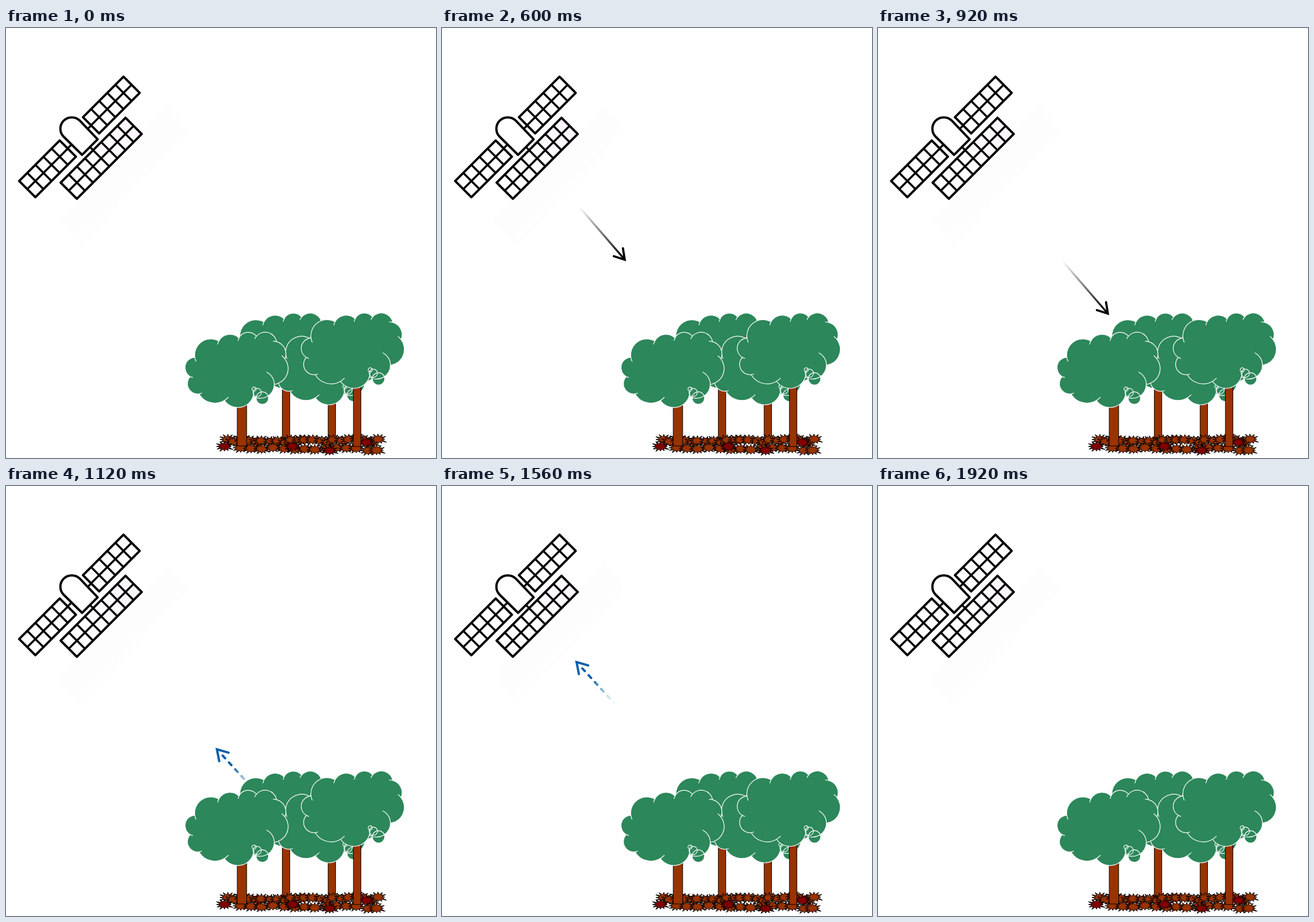
These frames come from a looping animation (748 by 748 pixels, 2250 ms). An HTML page:

```html
<!DOCTYPE html>
<html lang="en">
<head>
<meta charset="utf-8">
<title>Satellite and forest</title>
<style>
html, body { margin: 0; width: 100%; height: 100%; overflow: hidden; background: #fff; }
svg { display: block; width: 100vw; height: 100vh; }
.grid { fill: none; stroke: #000; stroke-width: 3.6; }
.hull { stroke: #000; stroke-width: 4; stroke-linejoin: round; }
.cloud { fill: #2c875a; stroke: #fff; stroke-width: 1.2; }
.vein { fill: none; stroke: #fff; stroke-width: 1.2; }
.trunk, .leaf { fill: #993300; stroke: #000; stroke-width: 1; }
.leaf.dark { fill: #800000; }
</style>
</head>
<body>
<svg id="stage" viewBox="0 0 748 748">
  <defs>
    <linearGradient id="inkDown" gradientUnits="userSpaceOnUse" x1="-125" y1="0" x2="-10" y2="0">
      <stop offset="0" stop-color="#000" stop-opacity="0"/>
      <stop offset="1" stop-color="#000"/>
    </linearGradient>
    <linearGradient id="inkUp" gradientUnits="userSpaceOnUse" x1="-102" y1="0" x2="-46" y2="0">
      <stop offset="0" stop-color="#9fc8d6" stop-opacity="0.1"/>
      <stop offset="1" stop-color="#0a60aa"/>
    </linearGradient>
    <linearGradient id="veil" gradientUnits="userSpaceOnUse" x1="185" y1="236" x2="224" y2="277">
      <stop offset="0" stop-color="#fdfdfd"/>
      <stop offset="0.5" stop-color="#fdfdfd" stop-opacity="0.95"/>
      <stop offset="1" stop-color="#fcfcfc" stop-opacity="0.5"/>
    </linearGradient>
    <linearGradient id="tint" gradientUnits="userSpaceOnUse" x1="110" y1="283" x2="222" y2="171">
      <stop offset="0.4" stop-color="#fff"/>
      <stop offset="1" stop-color="#fbf4fc"/>
    </linearGradient>
  </defs>
  <rect y="747" width="365" height="1" fill="#f8f8f8"/>
  <g id="down" fill="none" stroke-width="3.8">
    <path d="M-127 0H-5" stroke="url(#inkDown)" stroke-width="3.4"/>
    <path d="M-21 -10.5L-4 0L-21 10.5" stroke="#000" stroke-linecap="round"/>
  </g>
  <g id="up" fill="none" stroke-width="4">
    <path d="M-18.8 0H-101" stroke="url(#inkUp)" stroke-linecap="round" stroke-dasharray="6.4 9.8"/>
    <path d="M-22 -11L-4 0L-22 11" stroke="#0a60aa" stroke-linecap="round"/>
  </g>
  <path d="M89 335L131 379L319 177L281 137Z" fill="url(#veil)"/>
  <g id="satellite" transform="translate(-0.6 -0.8)"></g>
  <g id="forest"></g>
</svg>
<script>
const NS = "http://www.w3.org/2000/svg";
const $ = id => document.getElementById(id);

function add(parent, tag, attrs) {
  const el = document.createElementNS(NS, tag);
  for (const k in attrs) el.setAttribute(k, attrs[k]);
  parent.appendChild(el);
  return el;
}

let seed = 7;
const random = () => (seed = seed * 16807 % 2147483647) / 2147483647;
const spread = n => (random() * 2 - 1) * n;

function polar(r, deg) {
  const a = deg * Math.PI / 180;
  return [r * Math.cos(a), r * Math.sin(a)];
}

// ---- Satellite ----
const sat = $("satellite");

// Panel from its top corner: cells run down-left, two cells wide down-right.
function panel(x, y, cells, fill) {
  const s = 14.1, len = cells * s, wide = 2 * s;
  let d = `M${x + s} ${y + s}l${-len} ${len}`;
  for (let i = 1; i < cells; i++) d += `M${x - i * s} ${y + i * s}l${wide} ${wide}`;
  add(sat, "path", {
    class: "hull", fill,
    d: `M${x} ${y}l${wide} ${wide}l${-len} ${len}l${-wide} ${-wide}Z`
  });
  add(sat, "path", { class: "grid", d });
}
panel(205, 85.5, 5, "#fff");
panel(94, 196.5, 5, "#fff");
panel(208.5, 157, 8, "url(#tint)");
add(sat, "path", { class: "grid", d: "M148 171L142 177M108 210L116 202M147 208L153 214" });
add(sat, "path", {
  class: "hull", fill: "#fff",
  d: "M129 162L160 194.5L133 221.5L101 190A19.7 19.7 0 0 1 129 162Z"
});

// ---- Trees ----
const forest = $("forest");

// Lobes clockwise from the left: radius, start angle, sweep, and how far the rim runs on inside.
const lobes = [
  [28, -188, 128], [22, -152, 107], [18, -154, 116], [20, -140, 130],
  [22, -75, 98], [28, -37, 119], [24, 0, 122, 64], [28, 17, 129],
  [32, 59, 91], [18, 83, 140], [18, 120, 144]
];

function cloudPaths() {
  let x = 16.3, y = 43.6, rim = `M${x} ${y}`, veins = "";
  for (const [r, from, sweep, lead = 16] of lobes) {
    const a = polar(r, from), b = polar(r, from + sweep), c = polar(r, from - lead);
    veins += `M${x} ${y}A${r} ${r} 0 0 0 ${x + c[0] - a[0]} ${y + c[1] - a[1]}`;
    x += b[0] - a[0];
    y += b[1] - a[1];
    rim += `A${r} ${r} 0 0 1 ${x} ${y}`;
  }
  rim += "Z";
  for (let k = 3; k > 0; k--) {
    const r = 3.6 * k;
    rim += `M${117.5 + 1.8 * k * k - r} ${97 + 1.95 * k * k}`
      + `a${r} ${r} 0 1 1 ${2 * r} 0a${r} ${r} 0 1 1 ${-2 * r} 0Z`;
  }
  return { rim, veins };
}
const { rim, veins } = cloudPaths();

function tree(x, y, foot, width = 13) {
  add(forest, "rect", { class: "trunk", x: x + 90, y: y + 115, width, height: foot - y - 115 });
  const g = add(forest, "g", { transform: `translate(${x} ${y})` });
  add(g, "path", { class: "cloud", d: rim });
  add(g, "path", { class: "vein", d: veins });
}

// ---- Fallen leaves ----
const burst = Array.from({ length: 24 }, (_, i) => {
  const [x, y] = polar(i % 2 ? 0.5 : 0.95 + spread(0.18), i * 15);
  return `${x * 15.5},${y * 9.5}`;
}).join(" ");

function leaf(x, y, tone = "") {
  add(forest, "polygon", { class: "leaf " + tone, points: burst, transform: `translate(${x} ${y})` });
}

// Even row of leaves, each nudged a little.
function litter(count, left, right, y) {
  for (let i = 0; i < count; i++)
    leaf(left + (right - left) * i / (count - 1) + spread(3), y + spread(4));
}

tree(390.7, 496, 714);
tree(470.3, 524.5, 718);
litter(22, 384, 647, 718);
litter(14, 409, 647, 732);
for (const [x, y] of [[380, 728], [498, 728], [563, 735], [627, 721]]) leaf(x, y, "dark");
tree(312.2, 529.2, 727, 16.5);
tree(514.3, 495.8, 728);

// ---- Motion ----
const LOOP = 2250, STEP = 40;
const flights = [
  { el: $("down"), start: 160, end: 1040, from: [230.5, 303], to: [410.5, 509], turn: 49.2 },
  { el: $("up"), start: 1040, end: 1920, from: [368.5, 460], to: [150.5, 211], turn: 227.5 }
];

// Constant speed with an even ramp at both ends.
function glide(u) {
  const ramp = 0.295, top = 1 / (1 - ramp);
  if (u < ramp) return top * u * u / (2 * ramp);
  if (u > 1 - ramp) return 1 - top * (1 - u) ** 2 / (2 * ramp);
  return top * (u - ramp / 2);
}

function draw(ms) {
  const t = Math.floor(ms / STEP) * STEP;
  for (const { el, start, end, from, to, turn } of flights) {
    const on = t >= start && t < end;
    el.style.visibility = on ? "visible" : "hidden";
    if (!on) continue;
    const p = glide((t - start) / (end - start));
    const [x, y] = from.map((v, i) => v + (to[i] - v) * p);
    el.setAttribute("transform", `translate(${x} ${y}) rotate(${turn})`);
  }
}

const begin = performance.now();
function tick() {
  draw((performance.now() - begin) % LOOP);
  requestAnimationFrame(tick);
}
draw(0);
requestAnimationFrame(tick);
</script>
</body>
</html>
```
